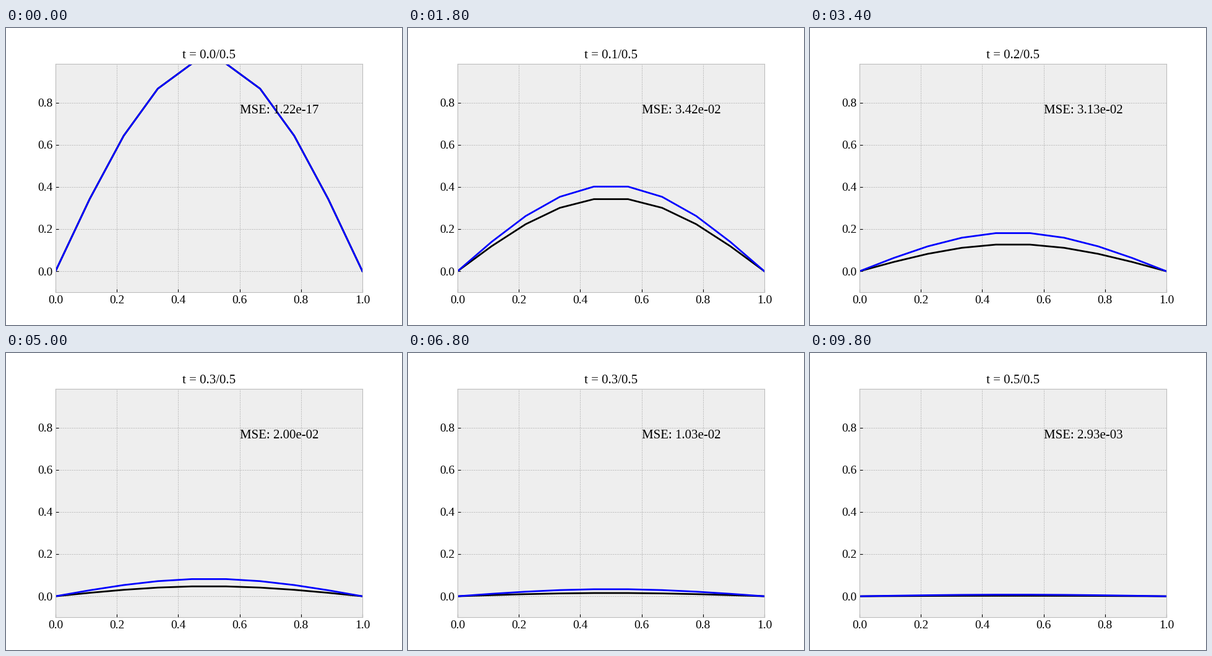
Write a matplotlib script that moves like this. It is 640x480 px and loops after 9900 ms.

```python
import numpy as np
import matplotlib.pyplot as plt
from matplotlib.animation import FuncAnimation

plt.style.use("bmh")
plt.rcParams.update({
    "font.family": "Liberation Serif",
    "font.size": 14,
    "axes.titlesize": 15,
})

FRAMES = 99
T_END = 0.5
NODES = 10

x = np.linspace(0, 1, NODES)
times = np.linspace(0, T_END, FRAMES + 1)
start = np.sin(np.pi * x)


def exact(t):
    return start * np.exp(-np.pi**2 * t)


def solve():
    """Explicit finite differences for the heat equation."""
    dt, dx = T_END / (FRAMES + 1), 1 / NODES
    r = dt / dx**2
    u = start.copy()
    u[[0, -1]] = 0
    # The first step repeats the initial state.
    steps = [u, u]
    while len(steps) < FRAMES:
        u = u.copy()
        u[1:-1] += r * (u[2:] - 2 * u[1:-1] + u[:-2])
        steps.append(u)
    return steps


numeric = solve()

fig, ax = plt.subplots(figsize=(6.4, 4.8), dpi=100)
ax.set_xlim(0, 1)
ax.set_ylim(-0.1, start.max())
ax.set_xticks(np.arange(0, 1.01, 0.2))
ax.set_yticks(np.arange(0, 0.81, 0.2))

numeric_line, = ax.plot(x, numeric[0], color="black", lw=2)
exact_line, = ax.plot(x, start, color="blue", lw=2)
error_text = ax.text(0.6, 0.75, "", fontsize=15)
title = ax.set_title("")


def update(i):
    u, v = numeric[i], exact(times[i])
    numeric_line.set_ydata(u)
    exact_line.set_ydata(v)
    error_text.set_text(f"MSE: {np.mean(np.abs(u - v)):.2e}")
    title.set_text(f"t = {times[i]:.1f}/{T_END}")
    return numeric_line, exact_line, error_text, title


anim = FuncAnimation(fig, update, frames=FRAMES, interval=100,
                     repeat=True, repeat_delay=0)
plt.show()
```
